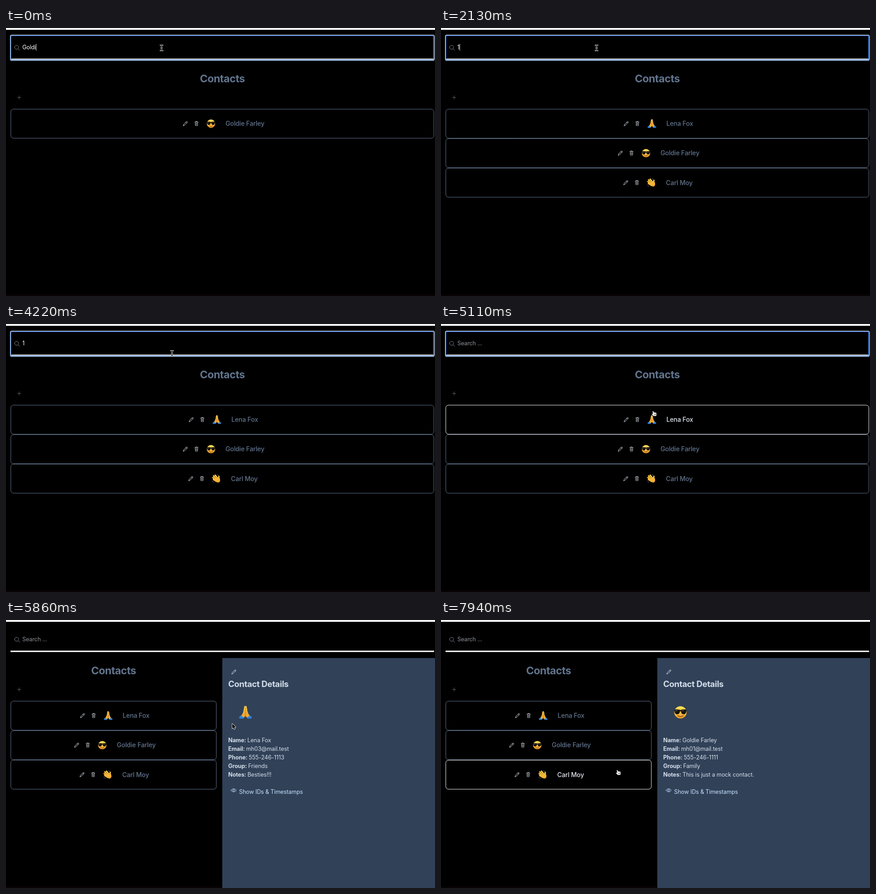
Recreate the animation shown at these times as an HTML page with a canvas. Size 946x592 px, loop 8 s.

```html
<!DOCTYPE html>
<html lang="en">
<head>
<meta charset="utf-8">
<title>Contacts</title>
<style>
  html, body { margin: 0; width: 100%; height: 100%; overflow: hidden; background: #000; }
  canvas { display: block; }
</style>
</head>
<body>
<canvas id="stage" width="946" height="592"></canvas>
<script>
const ctx = document.getElementById('stage').getContext('2d');
const LOOP = 8000;
const SLATE = '#62748e', PALE = '#e2e8f0', PANEL_TEXT = '#d3dde9', LINK = '#c6e0ff';
const BODY = 12.55;

const contacts = [
  { name: 'Lena Fox', x: 497, icon: prayer, email: 'mh03@mail.test', phone: '555-246-1113', group: 'Friends', notes: 'Besties!!!' },
  { name: 'Goldie Farley', x: 484, icon: shades, email: 'mh01@mail.test', phone: '555-246-1111', group: 'Family', notes: 'This is just a mock contact.' },
  { name: 'Carl Moy', x: 496, icon: wave, email: 'mh02@mail.test', phone: '555-246-1112', group: 'Work', notes: '' }
];

// [start, typed text, caret visible]
const typing = [
  [0, 'Goldi', 1], [200, 'Goldie', 1], [650, 'Goldie', 0], [790, 'Goldi', 1], [940, 'Gold', 1],
  [1240, 'Gol', 1], [1390, 'Go', 1], [1530, 'G', 1], [1680, '', 1],
  [2130, '1', 1], [2430, '11', 1], [2580, '111', 1], [2730, '1111', 1], [3180, '1111', 0],
  [3770, '111', 0], [3920, '11', 0], [4220, '1', 0], [4370, '', 1], [4820, '', 0]
];

// [start, shape, x, y, hovered row]
const pointer = [
  [0, ibeam, 343, 44, -1], [3320, ibeam, 366, 65, -1],
  [4820, arrow, 372, 86, -1], [4970, arrow, 416, 138, -1], [5110, hand, 470, 198, 0],
  [5260, hand, 502, 239, 0], [5560, hand, 501, 236, 0], [5860, arrow, 499, 229, -1],
  [6310, arrow, 500, 225, -1], [6460, arrow, 484, 243, -1], [6600, hand, 452, 263, 1],
  [6740, hand, 420, 276, 1], [6890, hand, 402, 282, 1],
  [7790, hand, 394, 319, 2], [7940, hand, 391, 337, 2]
];

const BLUR_AT = 5710, OPEN_AT = 5860, SWITCH_AT = 7340;
const at = (steps, t) => steps.filter(s => s[0] <= t).pop();

function text(str, x, y, size, color, weight = 400, align = 'left') {
  ctx.font = `${weight} ${size}px Inter, sans-serif`;
  ctx.letterSpacing = `${size * (size > 16 ? -0.02 : -0.01)}px`;
  ctx.textAlign = align;
  ctx.fillStyle = color;
  ctx.fillText(str, x, y);
  return ctx.measureText(str).width;
}

function rect(x, y, w, h, color) {
  ctx.fillStyle = color;
  ctx.fillRect(x, y, w, h);
}

function frame(x, y, w, h, r, color, width = 1) {
  ctx.beginPath();
  ctx.roundRect(x, y, w, h, r);
  ctx.strokeStyle = color;
  ctx.lineWidth = width;
  ctx.stroke();
}

function stroke(d, color, width) {
  ctx.strokeStyle = color;
  ctx.lineWidth = width;
  ctx.stroke(new Path2D(d));
}

function fill(d, color) {
  ctx.fillStyle = color;
  ctx.fill(new Path2D(d));
}

function place(x, y, scale, draw) {
  ctx.save();
  ctx.translate(x, y);
  ctx.scale(scale, scale);
  ctx.lineCap = ctx.lineJoin = 'round';
  draw();
  ctx.restore();
}

function vertical(top, bottom, from, to) {
  const g = ctx.createLinearGradient(0, top, 0, bottom);
  g.addColorStop(0, from);
  g.addColorStop(1, to);
  return g;
}

// Emoji, drawn in a 20-unit box around the origin
function shades() {
  fill('M-9.7 0a9.7 9.7 0 1 0 19.4 0a9.7 9.7 0 1 0-19.4 0', vertical(-10, 10, '#ffe45a', '#f09a28'));
  fill('M-9.6-4.2Q-5-5.2 0-3.6Q5-5.2 9.6-4.2L9.2-2.2C9 2 7 3 4.8 3C2 3 1.2.6.8-1.6H-.8C-1.2.6-2 3-4.8 3C-7 3-9 2-9.2-2.2Z', '#17130f');
  stroke('M-7.4-2.4L-5-2.8M2.8-2.4L5.2-2.8', '#77726b', 0.9);
  stroke('M-4.4 5.2Q0 8 4.4 5.2', '#7a3d0c', 1.1);
}

function prayer() {
  for (const side of [-1, 1]) {
    ctx.save();
    ctx.scale(side, 1);
    fill('M5.2 3.8L10 7.4Q10.4 9.8 8.4 10H2.8Q2 8.6 3.2 6.8Z', vertical(3, 10, '#4ba6ee', '#2474cf'));
    fill('M0-9.8Q1.5-10.8 2-8.6L3-2.6Q3.6 1.6 6.2 4.6L3.2 8.4Q1 7.6 0 5.6Z', vertical(-10, 8, '#ffd75a', '#f2a22c'));
    stroke('M2.3-3Q1.4 1 2.4 4', '#d98a20', 0.6);
    ctx.restore();
  }
  stroke('M0-9L0 5.4', '#b86c14', 0.8);
}

function wave() {
  const skin = vertical(-9, 9, '#ffd84f', '#f3a52d');
  const fingers = 'M-6.6-6.4L.6 1.4M-2.9-8L3.4-.6M-8.2-2.4L-.6 4.4M-7 2L0 6.4';
  stroke(fingers, '#b97816', 3.4);
  stroke(fingers, skin, 2.7);
  stroke('M5.8-5.4Q4.8-2 6.6 1', skin, 3);
  fill('M-2.4 1.6L3.6-2.6Q6.4-1.2 8 .2Q9.8 5.4 6.6 8.4Q2.8 10.6-1.4 6.6Z', skin);
  stroke('M2.6 1.2Q4.8-.8 6.2 1.4', '#c98519', 0.7);
  stroke('M1.8-9.4Q4.4-9.2 5-7.4M-9.2 5.4Q-8.2 8.2-5.4 8.8', '#5b8fb8', 0.8);
}

// Line icons
function pencil(x, y) {
  place(x, y, 1, () => stroke('M-4.6 4.8L-3.6 1.8L2.6-4.4Q3.2-5 3.8-4.4L4.5-3.7Q5-3.1 4.5-2.6L-1.8 3.7ZM1.4-3.2L3.3-1.3', PALE, 0.95));
}

function trash(x, y) {
  place(x, y, 1, () => stroke('M-3.7-3.4H3.7M-1.4-3.6V-4.7H1.4V-3.6M-2.9-3.2L-2.5 4.7H2.5L2.9-3.2M-.9-1.4V2.8M.9-1.4V2.8', PALE, 0.75));
}

function eye(x, y) {
  place(x, y, 1, () => stroke('M-6 0Q0-7.4 6 0Q0 7.4-6 0ZM-2 0a2 2 0 1 0 4 0a2 2 0 1 0-4 0', LINK, 0.95));
}

// Pointers
function ibeam() {
  const d = 'M-2.6-6Q0-6 0-3.5V3.5Q0 6-2.6 6M2.6-6Q0-6 0-3.5M0 3.5Q0 6 2.6 6M-1.2 0H1.2';
  stroke(d, '#e8e8e8', 2.6);
  stroke(d, '#000', 1);
}

function arrow() {
  const d = 'M0 0V10.6L2.4 8.4L4 12.2L6 11.3L4.4 7.7H7.6Z';
  stroke(d, '#fff', 1.6);
  fill(d, '#000');
}

function hand() {
  ctx.rotate(-0.1);
  fill('M-3-5.2Q-2-6.2-1-5L-.7-2.4Q.5-3 1.4-2.2Q2.7-2.7 3.4-1.6Q5-1.8 5 0V2.5L4 5.5H-1.4Q-3 3-5 1Q-5.2-.6-3.5 0L-2.3 1Z', '#fff');
  stroke('M.3.7V3.2M1.9.7V3.2M3.4.7V3.2', '#222', 0.7);
}

function drawSearch(t) {
  const [, typed, caret] = at(typing, t);
  const focused = t < BLUR_AT;
  rect(10, 67.7, 934, 3, '#fff');
  if (focused) {
    frame(10.9, 16.9, 932.2, 53.6, 2, '#0a5ed2', 1.6);
    frame(9.6, 15.6, 934.8, 56, 3, '#f2f7ff', 1.2);
  }
  place(24, 43, 1, () => stroke('M-5-.4a4.4 4.4 0 1 0 8.8 0a4.4 4.4 0 1 0-8.8 0M2.7 2.8L6.3 6.4', '#7b8490', 1));
  if (!typed) text('Search ...', 36, 47, BODY, '#8d9299');
  const width = typed ? text(typed, 36, 47, BODY, '#fff') : 0;
  if (focused && caret) rect(Math.round(36 + width), 35, 1, 15, '#d8d8d8');
}

function drawList(t) {
  const open = t >= OPEN_AT;
  const shift = open ? -239.7 : 0;
  const query = at(typing, t)[1].toLowerCase();
  const hovered = at(pointer, t)[4];
  text('Contacts', 477 + shift, 119.5, 23.2, SLATE, 700, 'center');
  stroke('M24.8 153.5H33.2M29 149.3V157.7', '#626a76', 0.9);

  contacts
    .filter(c => [c.name, c.email, c.phone].some(v => v.toLowerCase().includes(query)))
    .forEach((c, i) => {
      const x = c.x + shift, y = 211.2 + i * 65.2;
      frame(10.6, y - 32, open ? 453.2 : 932.8, 64.2, 6, i === hovered ? '#f8fafc' : SLATE);
      pencil(x - 88.5, y - 0.2);
      trash(x - 64, y - 0.2);
      place(x - 32, y, 0.95, c.icon);
      text(c.name, x, y + 5, 14, i === hovered ? PALE : SLATE, 500);
    });
}

function drawDetails(t) {
  if (t < OPEN_AT) return;
  const c = contacts[t < SWITCH_AT ? 0 : 1];
  rect(477, 84, 469, 508, '#314158');
  pencil(502.5, 114.5);
  text('Contact Details', 490, 147.5, 18.5, PANEL_TEXT, 700);
  place(528, 204, 1.4, c.icon);
  ['Name', 'Email', 'Phone', 'Group', 'Notes'].forEach((label, i) => {
    const y = 269.5 + i * 19.15;
    const width = text(label + ': ', 490, y, BODY, PANEL_TEXT, 700);
    text(c[label.toLowerCase()], 490 + width, y, BODY, PANEL_TEXT);
  });
  eye(502, 376.2);
  text('Show IDs & Timestamps', 514, 384, BODY, LINK);
}

function render(t) {
  rect(0, 0, 946, 592, '#000');
  rect(0, 588, 946, 4, '#080304');
  rect(0, 0, 946, 4, '#f8fdfb');
  drawSearch(t);
  drawList(t);
  drawDetails(t);
  const [, shape, x, y] = at(pointer, t);
  place(x, y, 1, shape);
}

const start = performance.now();
function loop() {
  render((performance.now() - start) % LOOP);
  requestAnimationFrame(loop);
}
loop();
</script>
</body>
</html>
```
